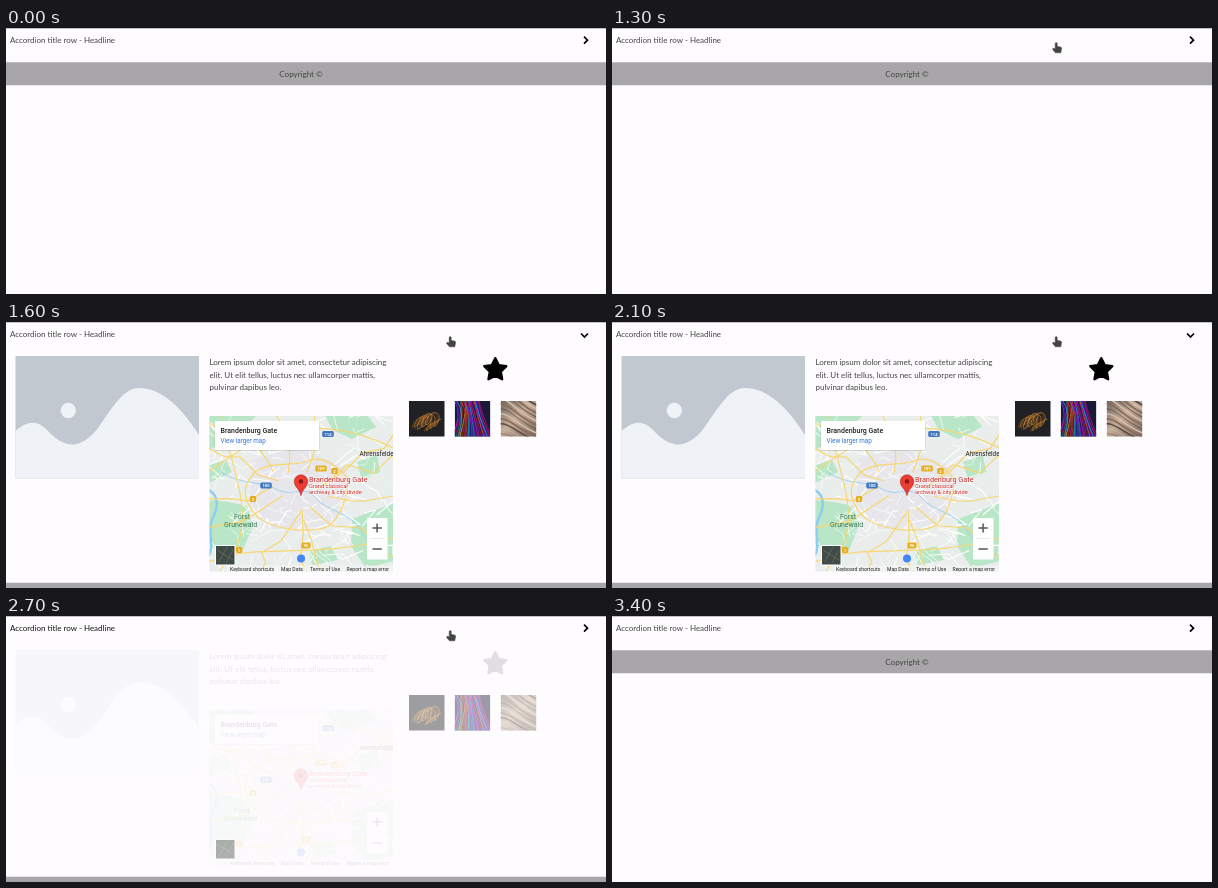
These frames come from a looping animation (600 px wide and 266 px high, 4100 ms). An HTML page:

```html
<!DOCTYPE html>
<html lang="en">
<head>
<meta charset="utf-8">
<title>Accordion</title>
<style>
  html, body { margin: 0; width: 100%; height: 100%; overflow: hidden; background: #fefcfe; }
  svg { display: block; width: 100vw; height: 100vh; }
  text { font: 8px Lato, "Noto Sans", sans-serif; fill: #444; }
  .map text { font-family: Roboto, sans-serif; font-size: 5.1px; fill: #222; }
  .map .pin { fill: #c5221f; font-size: 5.7px; stroke: #fff; stroke-width: 1; paint-order: stroke; }
  .map .name { font-size: 7px; font-weight: 500; }
  .map .pin.name { font-size: 7.3px; font-weight: 400; }
  .map .wood { fill: #3f7d5c; font-size: 7px; }
  .map .sign { fill: #fff; font-size: 4.2px; font-weight: 700; text-anchor: middle; }
  .line { fill: none; stroke-linecap: round; stroke-linejoin: round; }
</style>
</head>
<body>
<svg viewBox="0 0 600 266">
  <defs>
    <clipPath id="mapClip"><path d="M203.5 94H387V249.5H203.5Z"/></clipPath>
    <clipPath id="thumbClip"><path d="M0 0H35.5V35.5H0Z"/></clipPath>
    <linearGradient id="grain" x2="1" y2="1">
      <stop stop-color="#6f655f"/><stop offset=".45" stop-color="#c4ad98"/><stop offset="1" stop-color="#75635a"/>
    </linearGradient>
  </defs>
  <path d="M0 .5H600" stroke="#c4c2c4"/>
  <text id="title" x="4" y="15">Accordion title row - Headline</text>
  <path id="chevron" fill="none" stroke="#000" stroke-width="1.7"/>

  <g id="panel">
    <path d="M9.5 34H193V156.5H9.5Z" fill="#c1c8cf"/>
    <path d="M9.5 109C22 98 32 98 42 109C58 126 74 129 92 106C108 83 118 66 133 66C156 66 176 86 193 113V156.5H9.5Z" fill="#eff2f6"/>
    <circle cx="62.3" cy="88.5" r="7.7" fill="#eff2f6"/>
    <text x="203.5" y="43">Lorem ipsum dolor sit amet, consectetur adipiscing</text>
    <text x="203.5" y="55.5">elit. Ut elit tellus, luctus nec ullamcorper mattis,</text>
    <text x="203.5" y="68">pulvinar dapibus leo.</text>
    <path id="star" stroke="#000" stroke-width="2.4" stroke-linejoin="round"/>

    <g class="map" clip-path="url(#mapClip)">
      <path d="M203 94H388V250H203Z" fill="#e9eeec"/>
      <g fill="#b9e6c6">
        <path d="M203 94H250L238 106L203 128ZM319 94H362L370 105L346 117L327 108ZM203 178L222 180L241 184L247 204L237 228L212 230L203 222Z"/>
        <path d="M203 143L220 138L226 150L203 161ZM346 197L388 181V239L360 246L345 224ZM270 169L284 168V174L271 175ZM303 229L325 224L332 238L306 243ZM351 140L371 133L374 150L356 158Z"/>
      </g>
      <path d="M246 137L289 126L338 143L345 179L325 204L267 207L244 181Z" fill="#e7e7eb"/>
      <g id="streets" class="line" stroke="#fff"/>
      <g class="line" stroke="#8ccdf2">
        <path d="M203 168C215 175 211 188 206 198S209 222 203 233" stroke-width="2.5"/>
        <path d="M216 151C239 164 253 158 270 167S298 162 310 176S345 191 354 207S373 226 388 234" stroke-width=".8"/>
      </g>
      <g id="roads" class="line" stroke="#f8d671" stroke-width="1.2"/>
      <g id="signs"></g>
      <text x="353.5" y="133.5" style="font-size:6.4px">Ahrensfelde</text>
      <text class="wood" x="228" y="196.5">Forst</text>
      <text class="wood" x="218" y="204.5">Grunewald</text>
      <path d="M295 173.7C294 167 288.3 165.3 288.3 159.5A6.7 6.7 0 0 1 301.7 159.5C301.7 165.3 296 167 295 173.7Z" fill="#ea3d34" stroke="#b3261e" stroke-width=".6"/>
      <circle cx="295" cy="159.5" r="2.3" fill="#8c1712"/>
      <text class="pin name" x="303" y="159.7">Brandenburg Gate</text>
      <text class="pin" x="303" y="166">Grand classical</text>
      <text class="pin" x="303" y="172">archway &amp; city divide</text>
      <path d="M208.5 100H313.5V129H208.5Z" fill="#0002"/>
      <path d="M209 99H313V128H209Z" fill="#fff"/>
      <text class="name" x="214.5" y="111">Brandenburg Gate</text>
      <text x="214.5" y="121" style="font-size:6.3px;fill:#2f73d9">View larger map</text>
      <rect x="361" y="196" width="20.5" height="41.5" rx="1" fill="#fff"/>
      <path d="M364 216.5H378.5" stroke="#e4e4e4" stroke-width=".7"/>
      <path d="M366.5 206H375.8M371.1 201.4V210.6M366.5 227H375.8" stroke="#555" stroke-width="1.5"/>
      <circle cx="295" cy="236.5" r="4" fill="#4285f4"/>
      <path d="M221 243.7H387V249.5H221Z" fill="#f5f5f5bb"/>
      <text x="224" y="248.7">Keyboard shortcuts</text>
      <text x="275" y="248.7">Map Data</text>
      <text x="304" y="248.7">Terms of Use</text>
      <text x="340.5" y="248.7">Report a map error</text>
    </g>
  </g>

  <g id="photos">
    <g transform="translate(209 223)">
      <path d="M.5.5H20V20H.5Z" fill="#414b45" stroke="#fff"/>
      <path d="M2 5L18 15M4 17L12 2M11 18L18 5" stroke="#68716c" stroke-width=".7"/>
    </g>
    <g id="lights" class="line" clip-path="url(#thumbClip)" transform="translate(403 79)"></g>
    <g id="fibres" class="line" clip-path="url(#thumbClip)" transform="translate(448.7 79)"></g>
    <g id="wood" class="line" clip-path="url(#thumbClip)" transform="translate(494.7 79)"></g>
  </g>

  <g id="footer">
    <path d="M0 0H600V23H0Z" fill="#a8a6a8"/>
    <text x="295" y="14.5" text-anchor="middle">Copyright ©</text>
  </g>
  <path id="cursor" stroke-linejoin="round" fill="#444" stroke="#444" stroke-width=".5"
    d="M443.2 15.2Q444.2 13.8 445.2 15.2V18.3L449 19.2Q449.8 19.5 449.6 20.5L448.8 24.8H443.4L440.6 21.4Q440.6 20 442 20.4L443.2 21Z"/>
</svg>

<script>
const $ = id => document.getElementById(id);
let seed = 7;
const rnd = (lo, hi) => {
  seed = seed * 16807 % 2147483647;
  return lo + (hi - lo) * seed / 2147483647;
};
const repeat = (n, f) => Array.from({ length: n }, (_, i) => f(i)).join("");
const path = (d, extra = "") => `<path d="${d}" ${extra}/>`;

$("star").setAttribute("d", "M" + Array.from({ length: 10 }, (_, i) => {
  const a = i * Math.PI / 5, r = i % 2 ? 5.8 : 11.6;
  return [489.3 + r * Math.sin(a), 47.8 - r * Math.cos(a)].map(v => v.toFixed(1));
}).join("L") + "Z");

// Small streets at random, main roads running outwards from the centre
$("streets").innerHTML = repeat(130, () => {
  const x = rnd(203, 387), y = rnd(94, 249);
  return path(`M${x} ${y}l${rnd(-22, 22)} ${rnd(-16, 16)}l${rnd(-14, 14)} ${rnd(-12, 12)}`,
    `stroke-width="${rnd(.5, 1.2)}"`);
});
const spokes = repeat(13, i => {
  const a = i * Math.PI * 2 / 13 + rnd(0, .4), near = rnd(16, 36);
  const at = r => `${295 + r * Math.cos(a) + rnd(-9, 9)} ${172 + r * .88 * Math.sin(a) + rnd(-9, 9)}`;
  return path(`M${at(near)}L${at(52)}L${at(72)}L${at(95)}L${at(135)}`);
});
$("roads").innerHTML = spokes +
  path("M248 151C263 138 288 145 302 139S329 143 338 152S337 191 325 202S264 209 250 193S236 164 248 151Z") +
  path("M203 149C231 132 251 112 284 108S350 107 387 126M217 94C222 137 239 169 236 202S218 234 215 249M203 240C247 220 310 238 387 216");

const sign = (x, y, label, color) => {
  const w = 4 + label.length * 2.5;
  return `<rect x="${x - w / 2}" y="${y - 3}" width="${w}" height="6" rx="1.5" fill="${color}"/>
    <text class="sign" x="${x}" y="${y + 1.6}">${label}</text>`;
};
$("signs").innerHTML = sign(322, 112, "114", "#3f78bd") + sign(260, 163.5, "100", "#3f78bd") +
  [[315, 146.5, "109"], [328.5, 149, "2"], [247, 177, "2"], [300, 223.5, "96"], [233, 228, "1"]]
    .map(([x, y, label]) => sign(x, y, label, "#e5ad22")).join("");

const base = fill => path("M0 0H36V36H0Z", `fill="${fill}"`);
$("lights").innerHTML = base("#202124") + repeat(6, i =>
  path(`M${3 + i * 2} ${27 - i}c${rnd(0, 4)} -14 13 -11 9 -3s-9 5 -3 -3s14 -4 10 5s-7 2 3 -3`,
    `stroke="${i % 2 ? "#d08a35" : "#70491f"}" stroke-width=".7"`));
$("fibres").innerHTML = base("#1b1838") + repeat(34, i =>
  path(`M${rnd(-2, 10) + i * .5} -1Q${8 + i * .55} ${rnd(8, 16)} ${i * 1.25 - 4} 37`,
    `stroke="hsl(${rnd(180, 420)} 75% ${rnd(26, 54)}%)" stroke-width=".8"`));
$("wood").innerHTML = base("url(#grain)") + repeat(13, i =>
  path(`M-2 ${i * 5 - 22}C8 ${i * 5 - 24} 16 ${i * 4 - 4} 38 ${i * 4 + 5}`,
    `stroke="${["#574941", "#d6c0aa", "#8b6b57"][i % 3]}" stroke-width="${rnd(.6, 1.9)}"`));

const clamp = v => Math.max(0, Math.min(1, v));

function draw(now) {
  const t = Math.floor(now % 4100 / 100) * 100;
  const open = t >= 1400 && t < 2800;
  const fade = t < 2500 ? clamp((t - 1300) / 300) : [1, .55, .12][(t - 2500) / 100] || 0;
  $("panel").setAttribute("opacity", fade);
  $("photos").setAttribute("opacity", fade ** .4);
  $("footer").setAttribute("transform", `translate(0 ${open ? 260.8 : 34.3})`);
  $("chevron").setAttribute("d", t >= 1400 && t < 2600
    ? "M575 11.5L578.5 15L582 11.5" : "M578 8.7L581.5 12.2L578 15.7");
  $("title").style.fill = t >= 2600 && t < 3100 ? "#151515" : "#444";

  const enter = 46 * (1 - clamp((t - 300) / 700)) ** 3;
  const leave = 22 * clamp((t - 2800) / 400);
  $("cursor").setAttribute("transform", `translate(0 ${enter - leave})`);
  $("cursor").setAttribute("visibility", t >= 300 && t < 3200 ? "visible" : "hidden");
  requestAnimationFrame(() => draw(performance.now() - start));
}
const start = performance.now();
draw(0);
</script>
</body>
</html>
```
